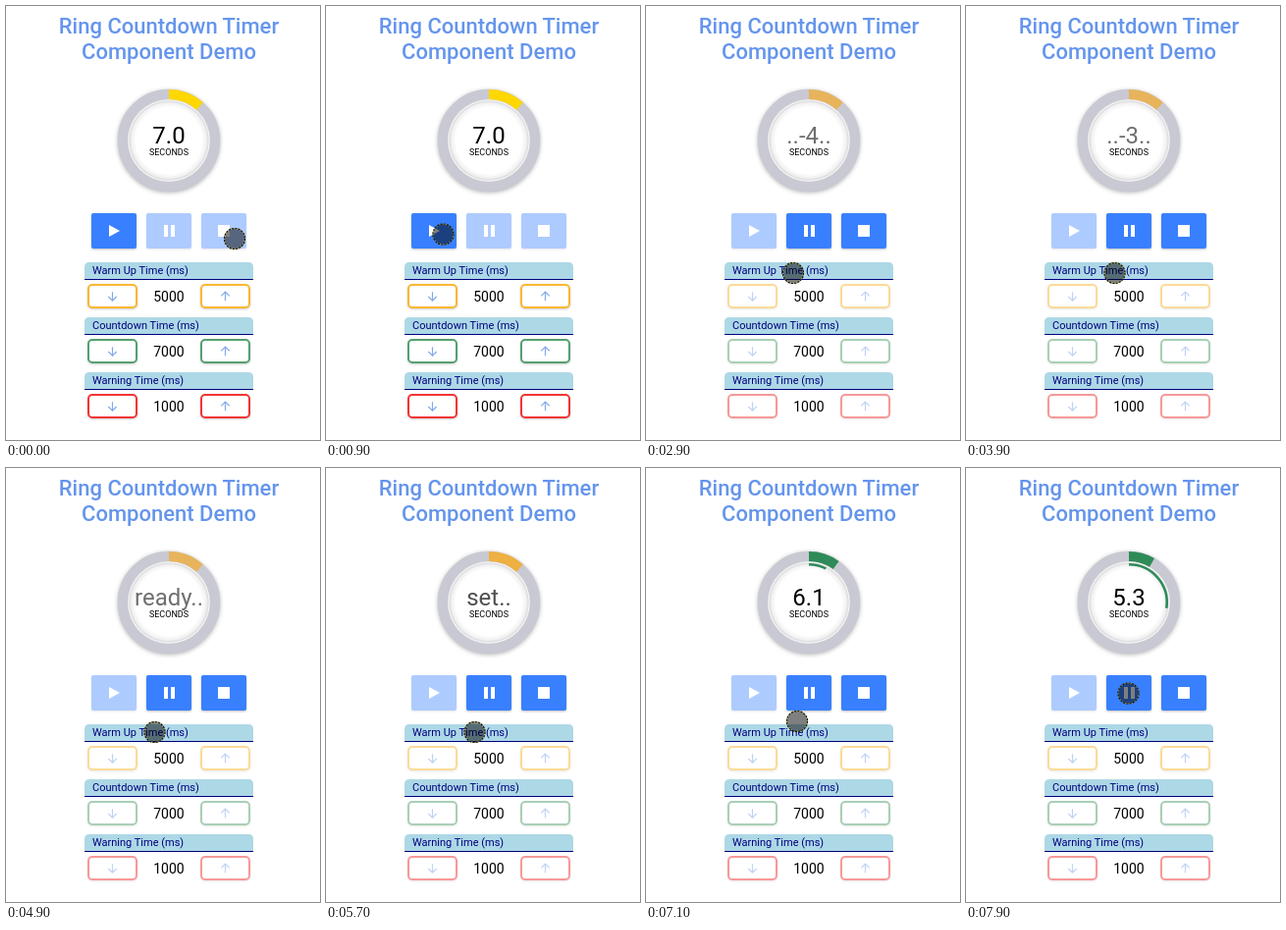
An HTML page that plays this animation: 320 by 442 pixels, repeating every 8 s.

```html
<!DOCTYPE html>
<html lang="en">
<head>
<meta charset="utf-8">
<title>Ring Countdown Timer</title>
<style>
  html, body { margin: 0; width: 100%; height: 100%; overflow: hidden; background: #fff; }
  svg { display: block; font-family: Roboto, "Open Sans", sans-serif; }
  .title { font-size: 22px; font-weight: 500; fill: #6495ed; }
  .mid { text-anchor: middle; }
  .button { filter: drop-shadow(0 1.5px 1px rgba(0, 0, 0, .26)); }
  .step { filter: drop-shadow(0 1px 1px rgba(0, 0, 0, .2)); }
</style>
</head>
<body>
<svg width="320" height="442" viewBox="0 0 320 442">
  <defs>
    <radialGradient id="dish">
      <stop offset=".8" stop-color="#fff"/>
      <stop offset=".91" stop-color="#f1f1f2"/>
      <stop offset=".955" stop-color="#dcdcde"/>
      <stop offset=".975" stop-color="#f5f5f6"/>
      <stop offset="1" stop-color="#e6e6e9"/>
    </radialGradient>
  </defs>
  <g class="title mid">
    <text x="166" y="28">Ring Countdown Timer</text>
    <text x="166" y="54">Component Demo</text>
  </g>
  <g style="filter:drop-shadow(0 1px 2px rgba(0,0,0,.28))">
    <circle cx="166" cy="137" r="47" fill="none" stroke="#c8c9d2" stroke-width="10.5"/>
  </g>
  <circle cx="166" cy="137" r="42" fill="url(#dish)"/>
  <path id="outer" fill="none" stroke-width="10"/>
  <path id="inner" fill="none" stroke="#2e8b57" stroke-width="2.6"/>
  <text id="count" class="mid" x="166" y="140" font-size="24"></text>
  <text class="mid" x="166" y="152" font-size="9">SECONDS</text>
  <g id="controls"></g>
  <g id="settings"></g>
  <g id="cursor">
    <circle r="11" fill="#000" fill-opacity=".5"/>
    <circle r="10.5" fill="none" stroke="#e8e060" stroke-opacity=".6"/>
    <circle r="10.5" fill="none" stroke="#111" stroke-width="1.2" stroke-dasharray="2 1.3"/>
  </g>
</svg>
<script>
const LOOP = 8000, STEP = 100;
const PRESS = 1300, WARM_UP = 1174, START = 6174;
const CX = 166, CY = 137;
const WARM_TEXT = ['..-5..', '..-4..', '..-3..', 'ready..', 'set..'];

// time, x, y
const CURSOR_PATH = [
  [100, 233, 237], [200, 222, 240], [300, 195, 241], [400, 160, 240],
  [500, 135, 235], [600, 125, 230], [700, 125, 230], [800, 121, 232],
  [900, 119.5, 232.5], [1500, 119.5, 232.5], [1700, 123, 238], [2000, 140, 258],
  [2100, 148, 267], [2200, 150, 271.5], [2900, 150, 272], [3000, 151.5, 272.5],
  [3900, 151.5, 272], [4400, 151.5, 269], [5800, 151.5, 269], [6200, 151.5, 267.5],
  [6900, 151.5, 267], [7100, 154, 258], [7300, 163, 236], [7400, 165.5, 229.5]
];

const byId = id => document.getElementById(id);
const set = (el, attrs) => {
  for (const name in attrs) el.setAttribute(name, attrs[name]);
};

const ICONS = [
  'M105 223v12l11-6z',
  'M161 223h4v12h-4zM168 223h4v12h-4z',
  'M216 223h12v12h-12z'
];
byId('controls').innerHTML = ICONS.map((icon, i) => `
  <g class="button">
    <rect x="${87 + 56 * i}" y="211" width="46" height="36" rx="2" fill="#3880ff"/>
    <path d="${icon}" fill="#fff"/>
  </g>`).join('');

const stepButton = (x, color, dir) => `
  <g class="step" transform="translate(${x} 284)">
    <rect width="49" height="23" rx="4" fill="#fff" stroke="${color}" stroke-width="2"/>
    <path transform="translate(24.5 11.7) scale(1 ${dir})" d="M0-4.5V4.3M-4.2.3L0 4.5 4.2.3"
      fill="none" stroke="#83a9e8" stroke-width="1.2"/>
  </g>`;

const SETTINGS = [
  ['Warm Up Time (ms)', 5000, '#fbb731'],
  ['Countdown Time (ms)', 7000, '#55a06e'],
  ['Warning Time (ms)', 1000, '#f33434']
];
byId('settings').innerHTML = SETTINGS.map(([label, value, color], i) => `
  <g transform="translate(0 ${56 * i})">
    <path d="M80 278v-12q0-5 5-5h162q5 0 5 5v12z" fill="#add8e6"/>
    <rect x="80" y="278" width="172" height="1" fill="#000080"/>
    <text x="88" y="273" font-size="11" fill="#000080">${label}</text>
    <g class="steps">${stepButton(84, color, 1)}${stepButton(199, color, -1)}</g>
    <text class="mid" x="166" y="301" font-size="14">${value}</text>
  </g>`).join('');

const buttons = document.querySelectorAll('.button');
const steppers = document.querySelectorAll('.steps');

// Clockwise arc from twelve o'clock
function arc(radius, degrees) {
  const a = degrees * Math.PI / 180;
  const x = CX + radius * Math.sin(a), y = CY - radius * Math.cos(a);
  return `M${CX} ${CY - radius}A${radius} ${radius} 0 ${+(degrees > 180)} 1 ${x} ${y}`;
}

function cursorAt(t) {
  const next = CURSOR_PATH.findIndex(p => p[0] > t);
  if (next === 0) return CURSOR_PATH[0].slice(1);
  if (next < 0) return CURSOR_PATH.at(-1).slice(1);
  const [t0, x0, y0] = CURSOR_PATH[next - 1], [t1, x1, y1] = CURSOR_PATH[next];
  const k = (t - t0) / (t1 - t0);
  return [x0 + (x1 - x0) * k, y0 + (y1 - y0) * k];
}

function timerAt(t) {
  if (t < PRESS) return { text: '7.0', color: '#ffd700', alpha: 1, seconds: 7, part: 0 };
  if (t < START) {
    const elapsed = (t - WARM_UP) / 1000;
    return {
      text: WARM_TEXT[Math.floor(elapsed)], color: '#ffa500',
      alpha: 1 - .6 * (elapsed % 1), seconds: 7, part: 0
    };
  }
  const left = 7 - (t - START) / 1000;
  return {
    text: left.toFixed(1), color: '#2e8b57', alpha: 1,
    seconds: Math.floor(left), part: left % 1
  };
}

function render(t) {
  const running = t >= PRESS;
  const { text, color, alpha, seconds, part } = timerAt(t);
  set(byId('outer'), { d: arc(47, seconds * 6), stroke: color, opacity: alpha });
  set(byId('inner'), { d: part ? arc(38.7, part * 360) : '' });
  set(byId('count'), { opacity: alpha });
  byId('count').textContent = text;
  buttons.forEach((b, i) => set(b, { opacity: (i > 0) === running ? 1 : .4 }));
  steppers.forEach(s => set(s, { opacity: running ? .5 : 1 }));
  set(byId('cursor'), { transform: `translate(${cursorAt(t)})` });
}

const begin = performance.now();
function tick() {
  const t = (performance.now() - begin) % LOOP;
  render(Math.floor(t / STEP) * STEP);
  requestAnimationFrame(tick);
}
tick();
</script>
</body>
</html>
```
